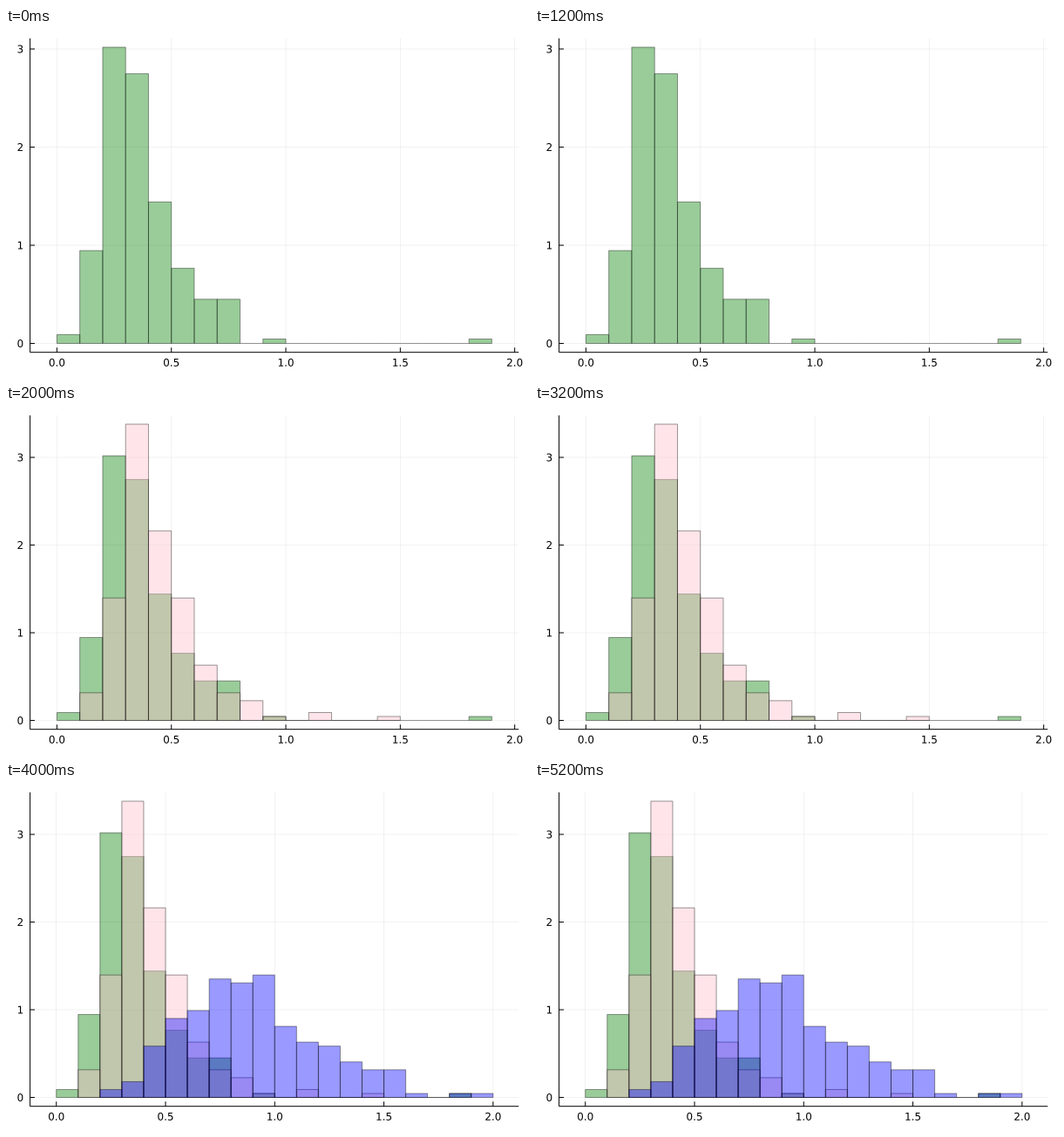
Write a matplotlib script that moves like this. It is 600 by 400 pixels and loops after 6000 ms.

```python
import matplotlib.pyplot as plt
from matplotlib.animation import FuncAnimation
from matplotlib.patches import PathPatch, Rectangle
from matplotlib.textpath import TextPath

plt.rcParams["font.family"] = "DejaVu Sans"

W, H, DPI = 600, 400, 100
LEFT, RIGHT, BOTTOM, TOP = 27.6, 588.19, 28.3, 388.19
BIN = 0.1
TOTAL = 222
MARGIN = 0.03
FONT = 12
ALPHA = 0.4

# colour, first bin, counts per bin
SERIES = [
    ("green", 0, [2, 21, 67, 61, 32, 17, 10, 10, 0, 1] + [0] * 8 + [1]),
    ("pink", 1, [7, 31, 75, 48, 31, 14, 7, 5, 1, 0, 2, 0, 0, 1]),
    ("blue", 2, [2, 4, 13, 20, 22, 30, 29, 31, 18, 14, 13, 9, 7, 7, 1, 0, 1, 1]),
]

fig = plt.figure(figsize=(W / DPI, H / DPI), dpi=DPI, facecolor="white")
ax = fig.add_axes([0, 0, 1, 1])


def px(width):
    """Line width in points for a width in pixels."""
    return width * 72 / DPI


def line(x0, y0, x1, y1, width=1, alpha=1.0):
    ax.plot([x0, x1], [y0, y1], color="black", lw=px(width), alpha=alpha,
            solid_capstyle="butt", snap=False)


def label(x, y, text, centred=False):
    advance = FONT * sum(0.318 if c == "." else 0.636 for c in text)
    start = x - advance / (2 if centred else 1)
    path = TextPath((start, y), text, size=FONT)
    ax.add_patch(PathPatch(path, fc="black", lw=0, snap=False))


def widen(lo, hi):
    pad = MARGIN * (hi - lo)
    return lo - pad, hi + pad


def mapper(lo, hi, start, end):
    """Linear map from data to pixels."""
    return lambda v: start + (v - lo) / (hi - lo) * (end - start)


def scales(shown):
    """Each series is padded on its own, then the whole range once more."""
    spans = [widen(first * BIN, (first + len(counts)) * BIN)
             for _, first, counts in shown]
    x_range = widen(min(lo for lo, _ in spans), max(hi for _, hi in spans))
    peak = max(max(counts) for _, _, counts in shown)
    y_range = widen(0, peak / (TOTAL * BIN))
    return mapper(*x_range, LEFT, RIGHT), mapper(*y_range, BOTTOM, TOP)


def draw_axes(to_x, to_y):
    x_ticks = [i * 0.5 for i in range(5)]
    y_ticks = range(4)
    for v in x_ticks:
        line(to_x(v), BOTTOM, to_x(v), TOP, 0.5, 0.1)
    for v in y_ticks:
        line(LEFT, to_y(v), RIGHT, to_y(v), 0.5, 0.1)

    line(LEFT, BOTTOM, RIGHT, BOTTOM)
    line(LEFT, BOTTOM, LEFT, TOP)
    for v in x_ticks:
        line(to_x(v), BOTTOM, to_x(v), BOTTOM + 5.4)
        label(to_x(v), 12.3, f"{v:.1f}", centred=True)
    for v in y_ticks:
        line(LEFT, to_y(v), LEFT + 5.4, to_y(v))
        label(20.2, to_y(v) - 4.4, str(v))


def draw_bars(color, first, counts, to_x, to_y):
    base = to_y(0)
    for i, n in enumerate(counts, first):
        x0, x1 = to_x(i * BIN), to_x((i + 1) * BIN)
        height = to_y(n / (TOTAL * BIN)) - base
        ax.add_patch(Rectangle((x0, base), x1 - x0, height, fc=color, ec="black",
                               lw=px(1), alpha=ALPHA, snap=False, zorder=3))


def draw(frame):
    ax.clear()
    ax.set_axis_off()
    ax.set(xlim=(0, W), ylim=(0, H))
    shown = SERIES[:frame + 1]
    to_x, to_y = scales(shown)
    draw_axes(to_x, to_y)
    for color, first, counts in shown:
        draw_bars(color, first, counts, to_x, to_y)
    return []


anim = FuncAnimation(fig, draw, frames=len(SERIES), init_func=lambda: [],
                     interval=2000, repeat=True, repeat_delay=0)
plt.show()
```
